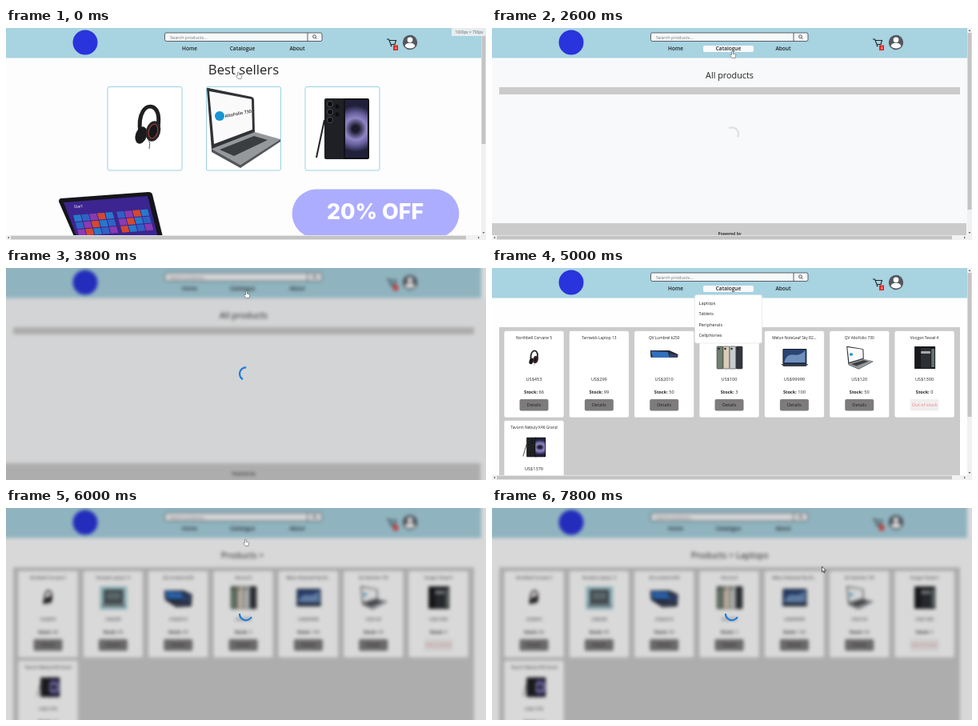
An HTML page that plays this animation: 600 px wide and 265 px high, repeating every 8 s.

```html
<!DOCTYPE html>
<html lang="en">
<head>
<meta charset="utf-8">
<title>Shop</title>
<style>
html, body { margin: 0; width: 100%; height: 100%; overflow: hidden; background: #fff; }
svg { display: block; width: 600px; height: 265px; }
text { font-family: "Open Sans", "Noto Sans", sans-serif; fill: #222; white-space: pre; }
.mid { text-anchor: middle; }
.bold { font-weight: 600; }
</style>
</head>
<body>
<svg id="stage" viewBox="0 0 600 265"></svg>
<script>
const LOOP = 8000, STEP = 200;

const text = (x, y, s, size, cls = 'mid', extra = '') =>
  `<text x="${x}" y="${y}" font-size="${size}" class="${cls}" ${extra}>${s}</text>`;
const rect = (x, y, w, h, fill, r = 0, extra = '') =>
  `<rect x="${x}" y="${y}" width="${w}" height="${h}" rx="${r}" fill="${fill}" ${extra}/>`;
const path = (d, fill, extra = '') => `<path d="${d}" fill="${fill}" ${extra}/>`;
const group = (inner, extra = '') => `<g ${extra}>${inner}</g>`;
const at = (x, y, scale, inner) => group(inner, `transform="translate(${x} ${y}) scale(${scale})"`);

// Product pictures, each drawn around its own centre.
const headset = path('M-9 10C-13-16-2-27 7-23Q16-18 13 2', 'none', 'stroke="#202022" stroke-width="5"')
  + `<ellipse cx="-8" cy="12" rx="7" ry="11" fill="#1b1b1d" transform="rotate(20 -8 12)"/>
     <ellipse cx="7" cy="7" rx="9" ry="13" fill="#252527" transform="rotate(15 7 7)"/>
     <ellipse cx="7" cy="7" rx="5.5" ry="9" fill="#161617" stroke="#a8443c" transform="rotate(15 7 7)"/>`
  + path('M1 17Q4 22 2 29', 'none', 'stroke="#555"');

const officeLaptop = label => path('M-46-48Q-46-50-44-49L10-38Q13-37 13-34L14 7-40 28Z', '#303236')
  + path('M-43-45L10-35 11 3-37 21Z', '#fafafa')
  + path('M-40 27L14 6 46 15-4 47Z', '#96999c')
  + path('M-30 28L13 11 30 16-12 36Z', '#3b3e41')
  + path('M-40 27L-4 47 46 15V18L-4 51-40 31Z', '#54575b')
  + '<circle cx="-30" cy="-14" r="6" fill="#1795d4"/>'
  + (label ? text(-23, -12, label, 5.4, 'bold', 'transform="rotate(-11 -23 -12)"') : '');

const stylusPhone = path('M-23-11L-33 36', 'none', 'stroke="#222" stroke-width="2"')
  + rect(-23, -38, 30, 76, '#1f2023', 2)
  + [-31, -21, -11].map(y => `<circle cx="-16" cy="${y}" r="3.6" fill="#0b0c0e" stroke="#4a4d52"/>`).join('')
  + '<circle cx="-7" cy="-28" r="2.5" fill="#0b0c0e"/><circle cx="-7" cy="-18" r="2.5" fill="#0b0c0e"/>'
  + rect(1, -38, 32, 76, '#111118', 2) + rect(3, -36, 28, 72, 'url(#glow)', 1);

const tealLaptop = rect(-17, -14, 34, 29, '#a3ccd4') + rect(-12, -10, 24, 16, '#3d4549')
  + rect(-9, -7, 18, 10, '#69777b') + path('M-12 6H12L15 11H-15Z', '#6d7578');
const blueLaptop = path('M-18-9L6-9 17-4 16 11-3 12-17 3Z', '#252a38') + path('M-17-8L4-7 7 2-14 2Z', '#2f6fc0')
  + path('M7-5L16-3 14 6 4 5Z', '#34466f') + path('M-8 5L13 7 15 9-2 10Z', '#43475a');
const phones = ['#708071', '#d9cdb9', '#c9cccd', '#33363c'].map((c, i) =>
  rect(-16 + i * 8, -14, 8, 28, c, 1, 'stroke="#333" stroke-width=".6"')
  + `<circle cx="${-13.5 + i * 8}" cy="-11" r="1.2" fill="#222"/>`).join('');
const thinLaptop = rect(-15, -11, 30, 19, '#16202f', 1) + rect(-14, -10, 28, 17, '#2b4474')
  + path('M-13 6C-8-12 2 4 13-9V6Z', '#6f90bd') + path('M-17 8H17L14 11H-14Z', '#353d49');
const darkPhone = rect(-13, -14, 26, 28, '#17191c') + rect(-5, -12, 12, 25, '#2c2f34', 1.5)
  + rect(-5, -8, 12, 3, '#a8a9aa', 1) + rect(8, -11, 4, 23, '#64716c');

const products = [
  ['Northbell Corvane 5', 453, 66, at(-1, 0, .36, headset)],
  ['Tarnwick Laptop 13', 299, 99, tealLaptop],
  ['QV Lumbrel k250', 2010, 50, blueLaptop],
  ['Ferrisol 8', 100, 3, phones],
  ['Melun NoteLeaf Sky R2...', 99999, 100, thinLaptop],
  ['QV AltoFolio 730', 120, 50, at(0, 0, '.36 .29', officeLaptop(''))],
  ['Voogan Tessel 4', 1300, 0, darkPhone],
  ['Tavorin Nebuly K46 Grand', 1379, 12, at(0, 0, '.43 .32', stylusPhone)],
];

function productCard([name, price, stock, picture], i) {
  const button = stock
    ? rect(19.5, 85.5, 36, 14.5, '#7d7b7c', 2) + text(37.5, 94.7, 'Details', 5.6)
    : rect(19.5, 85.5, 36, 14.5, '#f1eeee', 2)
      + text(37.5, 94.7, 'Out of stock', 5.6, 'mid', 'style="fill:#ea8080"');
  return at(15 + i % 7 * 81.35, 78.5 + Math.floor(i / 7) * 112, 1,
    rect(0, 0, 75, 108.5, '#fff', 2.5, 'stroke="#bcbcbc" stroke-width=".5"')
    + text(37.5, 10.4, name, 4.8)
    + at(38, 33.5, 1, group(picture, `id="pic${i}"`))
    + text(37.5, 62, 'US$' + price, 5.6)
    + text(37.5, 78.6, `<tspan font-weight="700">Stock:</tspan> ${stock}`, 5.6) + button);
}

const tileColors = ['#2879c9', '#d5482f', '#239652', '#8a3bb0', '#34a9c9', '#2f62c4', '#3fa05c'];
const tiles = Array.from({ length: 27 }, (_, i) =>
  rect(i % 9 * 10 + (i % 9 > 4 ? 4 : 0), Math.floor(i / 9) * 9, 9, 8,
    tileColors[(i * 5 + Math.floor(i / 4)) % 7])).join('');

const home = rect(-20, 37, 640, 250, '#fdfdfe')
  + text(297, 58.4, 'Best sellers', 16.7)
  + [127, 250.5, 374].map(x => rect(x, 73.5, 93, 104.5, '#fff', 2, 'stroke="#9bd0e2"')).join('')
  + at(177, 122, 1, headset) + at(297, 124, 1, officeLaptop('AltoFolio 730')) + at(421, 126, 1, stylusPhone)
  + path('M69 213L178 205Q182 205 183 208L197 265H87L66 217Q66 213 69 213Z', '#15151a')
  + path('M72 218L177 210 191 265H90Z', '#3c2590')
  + group(tiles, 'transform="matrix(1 -.08 .28 1 84 234)"')
  + text(85, 225, 'Start', 5, '', 'style="fill:#fff" transform="rotate(-4 85 225)"')
  + rect(357.6, 201.6, 208.8, 61, '#adadff', 30.5)
  + text(461.5, 238.6, '20% OFF', 26.8, 'mid', 'style="fill:#fff;font-family:Inter,sans-serif;font-weight:800"');

const catalogue = rect(-20, 37, 640, 250, '#f8f9fa', 0, 'id="paper"')
  + text(297, 63, '', 10.8, 'mid', 'id="heading"')
  + rect(9, 74, 576, 9, '#cccbcc', 0, 'id="shelf"')
  + group(rect(-20, 244, 613, 45, '#cccbcc') + text(297, 259.4, 'Powered by', 5.2, 'mid bold'), 'id="footer"')
  + group(products.map(productCard).join(''), 'id="cards"');

const header = rect(-20, -20, 614, 57.5, '#a8d3e1')
  + '<circle cx="99" cy="18" r="15.5" fill="#2934dc"/>'
  + rect(198.5, 6, 196.5, 10.5, '#f6f8f9', 2, 'stroke="#4b5257" stroke-width=".9"')
  + path('M377 6V16.5', 'none', 'stroke="#4b5257" stroke-width=".9"')
  + text(205, 13.5, 'Search products...', 5.6, '', 'style="fill:#777"')
  + '<circle cx="385.5" cy="10.7" r="1.9" fill="none" stroke="#333" stroke-width=".8"/>'
  + path('M387 12.2L388.5 13.7', 'none', 'stroke="#333" stroke-width=".8"')
  + rect(264, 22, 63, 8, '#f8fafb', 2, 'id="active"')
  + [['Home', 229.5], ['Catalogue', 295.5], ['About', 364]].map(([s, x]) => text(x, 28, s, 6.5, 'mid bold')).join('')
  + path('M476 14H478.5L481 20.5H486L487.5 15.5H479', 'none', 'stroke="#222" stroke-width="1.1"')
  + '<circle cx="481.5" cy="22.3" r="1" fill="#222"/>'
  + rect(484, 21.5, 6, 6.5, '#e5221d', .5) + text(487, 26.6, '4', 4.8, 'mid', 'style="fill:#fff"')
  + '<circle cx="505" cy="18" r="9.2" fill="#54585e"/><circle cx="505" cy="14.8" r="3.4" fill="#fff"/>'
  + path('M498.7 23Q499 18.8 505 18.8T511.3 23Q505 28 498.7 23Z', '#fff');

const dropdown = rect(253.5, 33.5, 84, 60.5, '#fff', 2.5, 'stroke="#dcdfe2" stroke-width=".6"')
  + ['Laptops', 'Tablets', 'Peripherals', 'Cellphones'].map((s, i) => text(258.5, 45.6 + i * 13.5, s, 5.6, '')).join('');

const scrollbars = rect(594, 0, 6, 265, '#f1f1f1') + rect(0, 259, 600, 6, '#f1f1f1')
  + rect(594.5, 6, 5, 139, '#c4c4c4', 0, 'id="thumb"') + rect(6, 259.7, 569, 4.6, '#c4c4c4')
  + path('M4 260.5V263.5L2 262ZM590 260.5V263.5L592 262ZM595.5 4H598.5L597 2ZM595.5 255H598.5L597 257Z', '#666');

const sizeLabel = rect(557, 0, 43, 10, '#e6edf0') + text(579, 6.8, '1600px × 706px', 4.8, 'mid', 'style="fill:#666"');

const hand = path('M-1.5-3.5Q-.5-4.5.3-3.5V-.8L3.3 0Q4 .4 3.7 2L3 4.5H-.8L-3.4 1.3Q-3-.2-1.5.8Z',
  '#fff', 'id="hand" stroke="#555" stroke-width=".6"');
const arrow = path('M-1.5-4V3L.1 1.6 1.2 4.2 2.2 3.8 1.1 1.2H3.3Z', '#fff', 'id="arrow" stroke="#222" stroke-width=".7"');

document.getElementById('stage').innerHTML = `
  <defs><radialGradient id="glow" gradientUnits="userSpaceOnUse" cx="16" cy="0" r="34">
    <stop offset=".12" stop-color="#1c1a2c"/><stop offset=".4" stop-color="#8f86c4"/>
    <stop offset=".58" stop-color="#6a62a0"/><stop offset=".85" stop-color="#20203a"/>
  </radialGradient></defs>`
  + group(rect(-20, -20, 640, 305, '#fff') + group(home, 'id="home"') + group(catalogue, 'id="catalogue"')
    + header + group(dropdown, 'id="dropdown"'), 'id="page"')
  + rect(0, 0, 600, 265, '#000', 0, 'id="shade"')
  + group(scrollbars, 'id="scrollbars"') + group(sizeLabel, 'id="sizeLabel"')
  + '<circle id="spinner" r="8" fill="none" stroke-width="2.2" stroke-dasharray="21 60"/>'
  + group(hand + arrow, 'id="cursor"');

const $ = id => document.getElementById(id);
const show = (id, on) => { $(id).style.display = on ? '' : 'none'; };

// Linear interpolation through [time, value] pairs.
function track(t, keys) {
  const i = keys.findIndex(k => k[0] > t);
  if (i < 0) return keys[keys.length - 1][1];
  if (i === 0) return keys[0][1];
  const [t0, a] = keys[i - 1], [t1, b] = keys[i];
  return a + (b - a) * (t - t0) / (t1 - t0);
}

const veilKeys = [[2600, 0], [3000, 1], [4000, 1], [4400, 0], [5400, 0], [5800, 1]];
const menuKeys = [[1600, 0], [1800, .5], [2000, 1], [2400, 1], [2600, 0], [4400, 0], [4600, .5], [4800, 1], [5400, 1], [5800, 0]];
const xKeys = [[0, 291], [400, 291], [1400, 297], [1800, 298], [2600, 301], [3800, 301], [6000, 300], [6200, 300], [7200, 414]];
const yKeys = [[0, 59], [400, 59], [1400, 34], [1800, 33], [4400, 33], [5400, 43], [6200, 43], [7200, 77]];

function draw(t) {
  const veil = track(t, veilKeys), menu = track(t, menuKeys);
  const inShop = t >= 2600, loaded = t >= 4200;
  show('home', !inShop);
  show('catalogue', inShop);
  show('active', inShop && veil < .5);
  show('sizeLabel', t < 800);
  show('cards', loaded);
  show('footer', !loaded);
  show('pic1', t >= 5200);
  $('pic2').style.clipPath = t < 5200 ? 'inset(0 0 58% 0)' : 'none';
  $('paper').setAttribute('fill', loaded ? '#fefefe' : '#f8f9fa');
  $('shelf').setAttribute('height', loaded ? 220 : 9);
  $('heading').textContent = t < 5600 ? 'All products' : t < 6600 ? 'Products > ' : 'Products > Laptops';

  $('page').style.filter = veil ? `blur(${2.2 * veil}px)` : 'none';
  $('shade').setAttribute('opacity', .15 * veil);
  show('scrollbars', veil === 0);
  $('thumb').setAttribute('height', !inShop ? 139 : loaded ? 180 : 221);

  const scale = .78 + .22 * menu;
  $('dropdown').setAttribute('opacity', menu);
  $('dropdown').setAttribute('transform', `translate(295.5 33) scale(${scale}) translate(-295.5 -33)`);

  const turn = t < 5000 ? -120 + (t - 2600) * .2 : 30 + (t - 6000) * .2;
  show('spinner', (inShop && !loaded) || t >= 5600);
  $('spinner').setAttribute('stroke', t < 2800 ? '#dfe0e1' : '#1f7bdc');
  $('spinner').setAttribute('transform', `translate(300 132.3) rotate(${turn})`);

  show('cursor', t < 4800 || t >= 5400);
  show('hand', t < 6400);
  show('arrow', t >= 6400);
  $('cursor').setAttribute('transform', `translate(${track(t, xKeys)} ${track(t, yKeys)})`);
}

const start = performance.now();
function tick() {
  const t = (performance.now() - start) % LOOP;
  draw(Math.floor(t / STEP) * STEP);
  requestAnimationFrame(tick);
}
tick();
</script>
</body>
</html>
```
